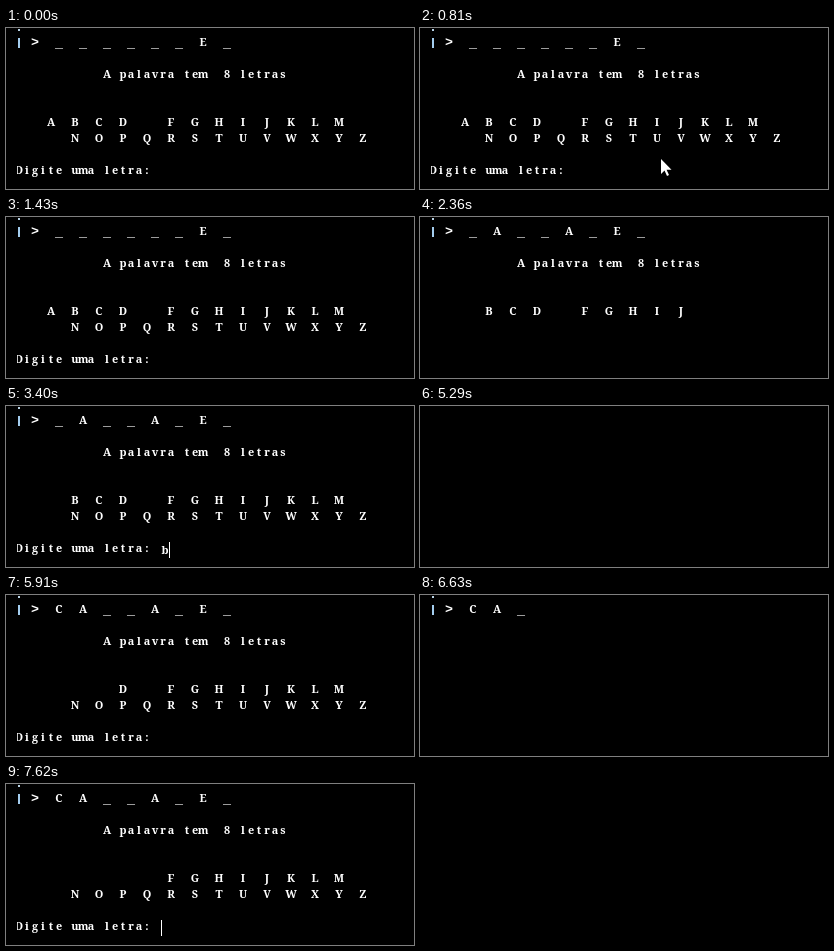
An HTML page that plays this animation: 408 by 161 pixels, repeating every 8 s.

```html
<!DOCTYPE html>
<html lang="pt">
<head>
<meta charset="utf-8">
<title>Jogo da forca</title>
<style>
  html, body { margin: 0; width: 100%; height: 100%; overflow: hidden; background: #000; }
  svg { display: block; width: 408px; height: 161px; }
  text {
    font: 700 10.9px "Noto Serif", serif;
    font-stretch: 100%;
    fill: #fff; text-anchor: middle; white-space: pre;
  }
  text.mono { font: 700 13.333px "Liberation Mono", monospace; }
</style>
</head>
<body>
<svg id="stage" viewBox="0 0 408 161">
  <defs><clipPath id="edge"><rect x="11" y="0" width="397" height="161"/></clipPath></defs>
  <rect width="408" height="161"/>
  <g id="screen" clip-path="url(#edge)"></g>
  <rect id="caret" x="155" y="136" width="1" height="16" fill="#fff"/>
  <path id="pointer" d="M0 0V15L3.5 11.5L6 17L8 16L5.6 10.8H10.5Z" fill="#fff"/>
</svg>
<script>
const LOOP = 8000, CELL = 8, LEFT = 9;
const NS = 'http://www.w3.org/2000/svg';
const byId = id => document.getElementById(id);
const screen = byId('screen'), caret = byId('caret'), pointer = byId('pointer');

function add(parent, tag, attrs, text = '') {
  const el = document.createElementNS(NS, tag);
  for (const key in attrs) el.setAttribute(key, attrs[key]);
  el.textContent = text;
  parent.append(el);
  return el;
}
const show = (el, on) => el.setAttribute('visibility', on ? 'visible' : 'hidden');

// Tokens are listed in the order the console prints them.
const tokens = [];
function token() {
  const el = add(screen, 'g', {});
  tokens.push(el);
  return el;
}
function print(parent, text, col, y) {
  [...text].forEach((ch, i) => {
    if (ch === ' ') return;
    const attrs = { x: LEFT + (col + i + .5) * CELL, y };
    if ('_>'.includes(ch)) attrs.class = 'mono';
    add(parent, 'text', attrs, ch);
  });
}

const mark = token();
add(mark, 'rect', { x: 12, y: 1, width: 2, height: 2, fill: '#b9d3e6' });
add(mark, 'rect', { x: 12, y: 10, width: 2, height: 10, fill: '#a4cdee' });
print(mark, '>', 2, 18);

const slots = [...'CA__A_E_'].map((letter, i) => {
  const group = token(), blank = add(group, 'g', {}), guess = add(group, 'g', {});
  print(blank, '_', 5 + 3 * i, 19);
  print(guess, letter, 5 + 3 * i, 18);
  return { letter, blank, guess };
});
['A palavra tem', '8 letras'].forEach((text, i) => print(token(), text, i ? 26 : 11, 50));

const keys = {};
[...'ABCDEFGHIJKLMNOPQRSTUVWXYZ'].forEach((letter, i) => {
  const col = i < 13 ? 4 + 3 * i : 7 + 3 * (i - 13);
  const group = token();
  print(group, letter, col, i < 13 ? 98 : 114);
  keys[letter] = group;
});
print(token(), 'Digite uma letra:', 0, 146);
const typed = add(screen, 'text', { x: 159, y: 148 });

// Each guess: key press, redraw start and end, number of redraw steps, tokens kept at first.
const guesses = [
  { letter: 'A', press: 1800, from: 2170, to: 2460, steps: 6, keep: 0 },
  { letter: 'B', press: 3400, from: 3630, to: 3930, steps: 7, keep: 0 },
  { letter: 'C', press: 5010, from: 5290, to: 5540, steps: 6, keep: 0 },
  { letter: 'D', press: 6300, from: 6580, to: 6880, steps: 7, keep: 1 }
];
const blinks = [880, 1430, 1800, 2170, 2460, 2850, 3220, 3630, 3930, 4250,
                4640, 5290, 5540, 5910, 6300, 6580, 6880, 7250, 7620, LOOP];

function printed(t) {
  const g = guesses.find(g => t >= g.from && t < g.to);
  if (!g) return tokens.length;
  const last = g.steps - 1;
  const step = Math.floor((t - g.from) / (g.to - g.from) * last + 1e-6);
  if (!step) return g.keep;
  return Math.round(4 + (step - 1) / (last - 1) * (tokens.length - 4));
}

function movePointer(t) {
  const visible = t >= 510 && t < 1250;
  show(pointer, visible);
  if (!visible) return;
  const p = (Math.floor((t - 510) / 57) + 1) / 14;
  const x = 288 - 110 * p, y = 160 - 30 * Math.sin(Math.PI * p);
  pointer.setAttribute('transform', `translate(${Math.round(x)} ${Math.round(y)})`);
}

function draw(t) {
  const used = 'E' + guesses.filter(g => t >= g.from).map(g => g.letter).join('');
  const count = printed(t);
  tokens.forEach((el, i) => el.setAttribute('display', i < count ? 'inline' : 'none'));
  for (const s of slots) {
    const known = used.includes(s.letter);
    show(s.guess, known);
    show(s.blank, !known);
  }
  for (const letter in keys) show(keys[letter], !used.includes(letter));

  const entry = guesses.find(g => t >= g.press && t < g.from);
  typed.textContent = entry ? entry.letter.toLowerCase() : '';
  caret.setAttribute('x', entry ? 163 : 155);
  show(caret, blinks.filter(b => t >= b).length % 2 === 1);
  movePointer(t);
}

const start = performance.now();
function frame() {
  draw((performance.now() - start) % LOOP);
  requestAnimationFrame(frame);
}
draw(0);
requestAnimationFrame(frame);
</script>
</body>
</html>
```
